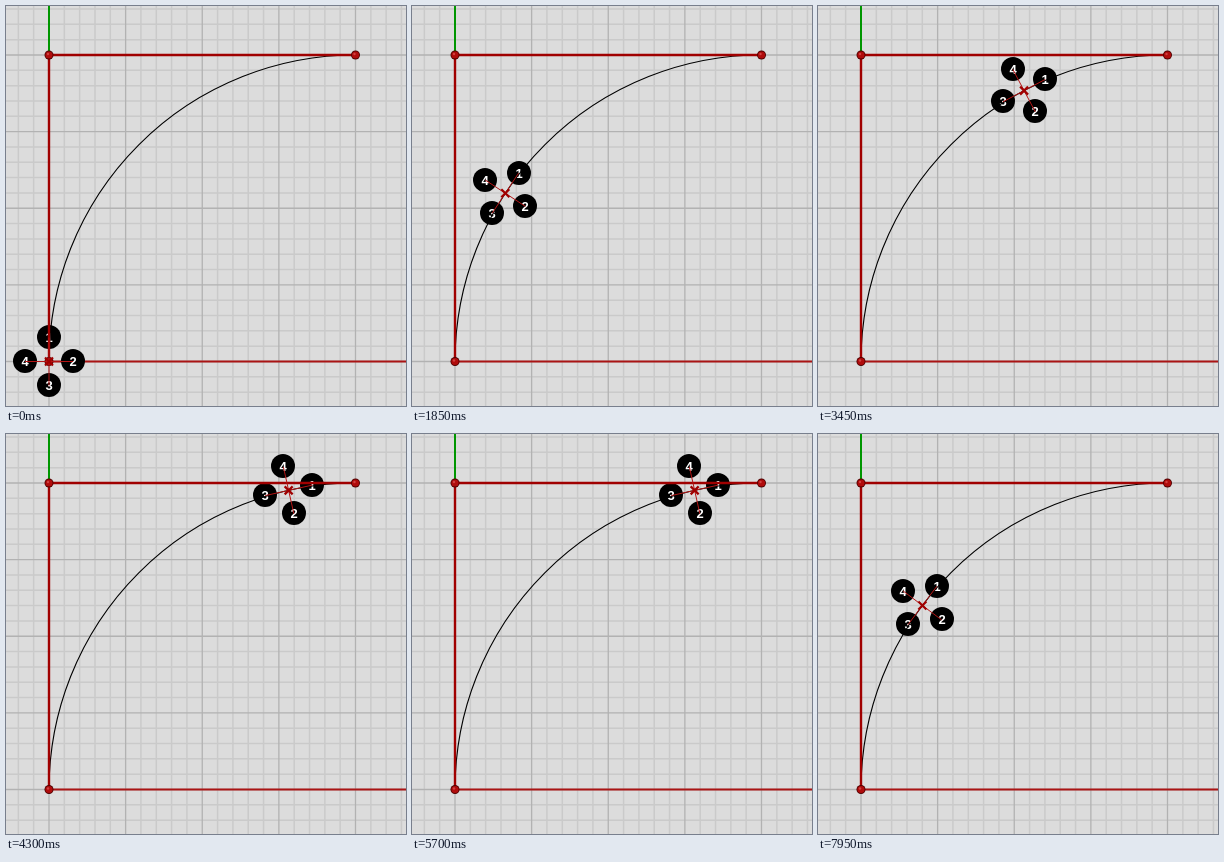
An HTML page with a canvas that plays this animation: 400x400 px, repeating every 8 s.

```html
<!DOCTYPE html>
<html lang="en">
<head>
<meta charset="utf-8">
<title>Frame moving along an arc</title>
<style>
html, body { margin: 0; width: 100%; height: 100%; overflow: hidden; background: #dcdcdc; }
canvas { display: block; width: 400px; height: 400px; }
</style>
</head>
<body>
<canvas id="stage" width="400" height="400"></canvas>
<script>
const ctx = document.getElementById('stage').getContext('2d');
const LOOP = 8000, STEP = 50, TURN = 5000;
const LEFT = 43, RIGHT = 349.5, TOP = 49, BOTTOM = 355.5;
const RADIUS = RIGHT - LEFT, ARM = 24;
const RED = '#a00000';

function line(color, width, ...points) {
  ctx.strokeStyle = color;
  ctx.lineWidth = width;
  ctx.beginPath();
  points.forEach(([x, y]) => ctx.lineTo(x, y));
  ctx.stroke();
}

function disc(x, y, r, fill) {
  ctx.fillStyle = fill;
  ctx.beginPath();
  ctx.arc(x, y, r, 0, 2 * Math.PI);
  ctx.fill();
}

function drawGrid() {
  ctx.fillStyle = '#dcdcdc';
  ctx.fillRect(0, 0, 400, 400);
  const cell = RADIUS / 20;
  for (const major of [false, true]) {
    const color = major ? '#b2b2b2' : '#cacaca';
    const width = major ? 1.3 : 1.5;
    for (let i = -5; i < 26; i++) {
      if ((i % 5 === 0) !== major) continue;
      const x = LEFT + i * cell, y = BOTTOM - i * cell;
      line(color, width, [x, 0], [x, 400]);
      line(color, width, [0, y], [400, y]);
    }
  }
  line('#009600', 2, [LEFT, 0], [LEFT, BOTTOM]);
  line('#aa1414', 2, [LEFT, BOTTOM], [400, BOTTOM]);
}

function drawControlPoint(x, y) {
  disc(x, y, 4.5, '#500000');
  disc(x, y, 3.6, '#b00c0c');
  disc(x - 1, y - 1, 1.2, '#d04040');
}

function draw(time) {
  const degrees = 90 * (1 - Math.abs(time - TURN) / TURN);
  const angle = degrees * Math.PI / 180;
  const sin = Math.sin(angle), cos = Math.cos(angle);
  const x = RIGHT - RADIUS * cos, y = BOTTOM - RADIUS * sin;
  // Ahead, right, behind and left of the direction of travel
  const tips = [[sin, -cos], [cos, sin], [-sin, cos], [-cos, -sin]]
    .map(([dx, dy]) => [x + ARM * dx, y + ARM * dy]);

  drawGrid();

  ctx.font = 'bold 13px "Liberation Sans", Arial, sans-serif';
  ctx.textAlign = 'center';
  tips.forEach(([tx, ty], i) => {
    const px = Math.round(tx), py = Math.round(ty - 0.5);
    disc(px, py, 12, '#000');
    ctx.fillStyle = '#fff';
    ctx.fillText(i + 1, px, py + 4.5);
  });

  ctx.strokeStyle = '#000';
  ctx.lineWidth = 1.1;
  ctx.beginPath();
  ctx.arc(RIGHT, BOTTOM, RADIUS, Math.PI, 1.5 * Math.PI);
  ctx.stroke();

  line(RED, 2.4, [LEFT, BOTTOM], [LEFT, TOP], [RIGHT, TOP]);
  drawControlPoint(LEFT, BOTTOM);
  drawControlPoint(LEFT, TOP);
  drawControlPoint(RIGHT, TOP);

  line('#b41414', 1, tips[0], tips[2]);
  line('#b41414', 1, tips[1], tips[3]);
  line(RED, 2.2, [x - 4, y - 4], [x + 4, y + 4]);
  line(RED, 2.2, [x - 4, y + 4], [x + 4, y - 4]);
}

const start = performance.now();
function tick() {
  const time = (performance.now() - start) % LOOP;
  draw(Math.floor(time / STEP) * STEP);
  requestAnimationFrame(tick);
}
tick();
</script>
</body>
</html>
```
